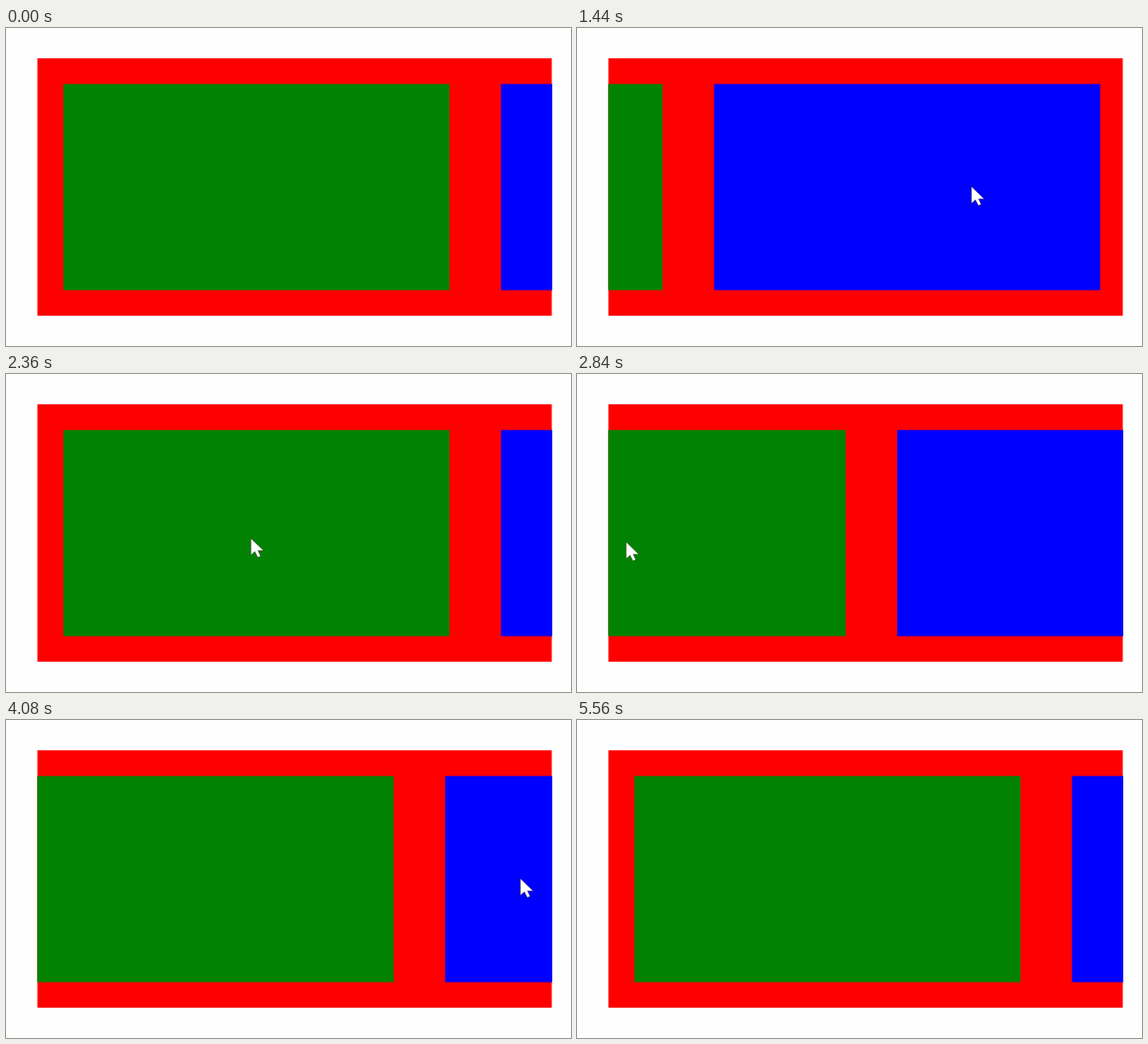
Recreate the animation shown at these times as an HTML page. Size 603 by 339 pixels, loop 5.64 s.

```html
<!DOCTYPE html>
<html lang="en">
<head>
<meta charset="utf-8">
<title>Snapping slider</title>
<style>
  html, body { margin: 0; width: 100%; height: 100%; overflow: hidden; background: #fefefe; }
  svg { display: block; width: 100%; height: 100%; }
</style>
</head>
<body>
<svg viewBox="0 0 603 339">
  <clipPath id="viewport"><rect x="33.4" y="32" width="549.6" height="275"/></clipPath>
  <rect x="33.5" y="32.3" width="549" height="274.4" fill="#f00"/>
  <g clip-path="url(#viewport)">
    <g id="track">
      <rect x="61.3" y="59.7" width="412" height="219.8" fill="#028202"/>
      <rect x="528.3" y="59.7" width="412" height="219.8" fill="#00f"/>
    </g>
  </g>
  <path id="pointer" d="M0 0V18L4.2 14.2L7.4 20.3L10.4 19L7.6 13.2H13.6Z"
        fill="#fff" stroke="#301010" stroke-opacity=".6" stroke-width=".7"/>
</svg>
<script>
const LOOP = 5640;
const track = document.getElementById('track');
const pointer = document.getElementById('pointer');

const linear = u => u;
const easeOut = u => 1 - (1 - u) ** 3;
const easeInOut = u => u < 0.5 ? 4 * u ** 3 : 1 - 4 * (1 - u) ** 3;

// Each key: time, easing used to arrive there, values.
const scrollKeys = [
  [0, linear, 0],
  [720, linear, 0],
  [1360, easeInOut, -384],
  [2095, easeInOut, 0],
  [2520, linear, 0],
  [2840, linear, -186],
  [3080, easeOut, -235],
  [3680, easeOut, -384],
  [3720, linear, -384],
  [4080, linear, -60],
  [4500, easeOut, 0],
  [LOOP, linear, 0]
];
const pointerKeys = [
  [0, linear, 470, 380],
  [320, linear, 470, 380],
  [560, easeOut, 421, 169],
  [2100, linear, 421, 169],
  [2480, easeInOut, 239, 176],
  [2520, linear, 239, 176],
  [2840, linear, 53, 179],
  [3080, easeOut, 4, 178],
  [3480, linear, 3, 178],
  [3720, easeInOut, 225, 172],
  [4080, linear, 549, 169],
  [4900, linear, 549, 169],
  [5300, easeInOut, 500, 360],
  [LOOP, linear, 500, 360]
];

function sample(keys, time) {
  const next = keys.findIndex(key => key[0] > time);
  const [start, , ...from] = keys[next - 1];
  const [end, ease, ...to] = keys[next];
  const progress = ease((time - start) / (end - start));
  return from.map((value, i) => value + (to[i] - value) * progress);
}

function draw() {
  const time = performance.now() % LOOP;
  const [scroll] = sample(scrollKeys, time);
  const [x, y] = sample(pointerKeys, time);
  track.setAttribute('transform', `translate(${scroll} 0)`);
  pointer.setAttribute('transform', `translate(${x} ${y})`);
  requestAnimationFrame(draw);
}
draw();
</script>
</body>
</html>
```
